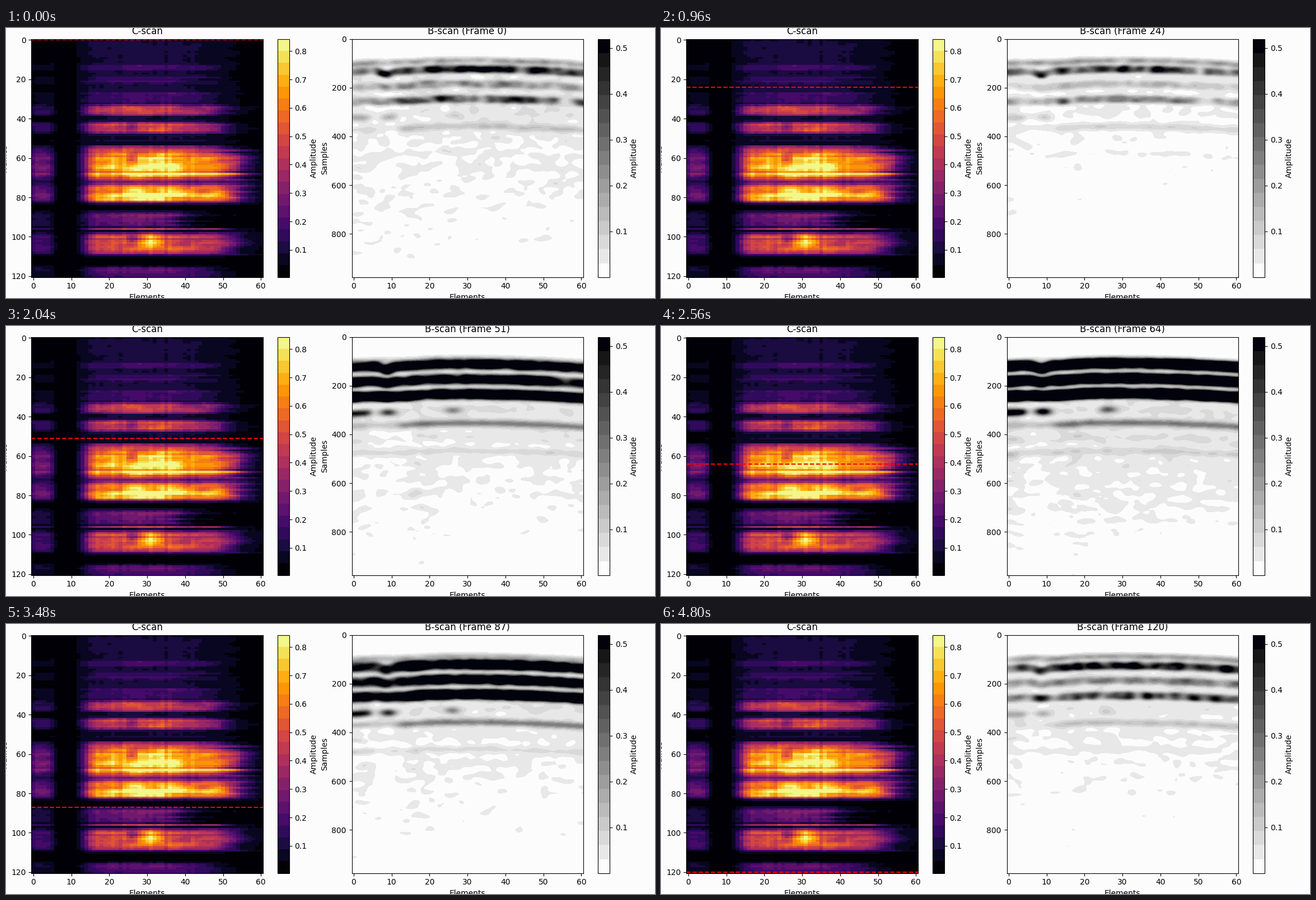
A matplotlib script that plays this animation: 1159 px wide and 483 px high, repeating every 4.84 s.

```python
import numpy as np
import matplotlib.pyplot as plt
from matplotlib.animation import FuncAnimation
from matplotlib.cm import ScalarMappable
from matplotlib.colors import ListedColormap, Normalize

W, H, DPI = 1159, 483, 100
FRAMES, ELEMS, DEPTH = 121, 61, 977.6
PAPER = "#fcfcfc"

rng = np.random.default_rng(7)
el = np.arange(ELEMS, dtype=float)
z = np.linspace(2, DEPTH - 2, 245)[:, None]


def bell(x, mid, width, power=2):
    return np.exp(-np.abs((x - mid) / width) ** power)


def step(x, edge, width):
    return 1 / (1 + np.exp(-(x - edge) / width))


def smooth(a, n, axis):
    k = np.hanning(n + 2)[1:-1]
    pad = [(0, 0), (0, 0)]
    pad[axis] = (n // 2, n // 2)
    a = np.pad(a, pad, mode="reflect")
    return np.apply_along_axis(np.convolve, axis, a, k / k.sum(), "valid")


def grain(rows, ny, nx):
    g = smooth(smooth(rng.normal(size=(rows, ELEMS)), ny, 0), nx, 1)
    return g / g.std()


# ---------- C-scan: horizontal bands of (row, half height, peak, right edge)
BANDS = [(14, 1.2, .11, 48), (20, 2, .08, 44), (29, 3, .09, 46),
         (35.5, 2.8, .38, 50), (44.5, 3, .38, 51), (55, 1.5, .3, 50),
         (64, 8, .74, 54), (77.8, 4.7, .82, 55), (91, 4, .24, 40),
         (96, .7, .4, 50), (103.5, 5.6, .52, 53), (118, 2.8, .2, 48)]


def make_cscan():
    row = np.arange(FRAMES, dtype=float)[:, None]
    wobble = 1.5 * rng.normal(size=(FRAMES, 1))
    streak = 1 + .08 * rng.normal(size=(FRAMES, 1))
    body = step(el, 13.8, 1) * (.7 + .3 * bell(el, 30, 13))
    dead = 1 - bell(el, 9, 2.8, 6)
    img = (.035 + .065 * bell(el, 30, 20, 4) * step(-row, -54, 2)) * dead * streak
    for mid, half, peak, edge in BANDS:
        layer = peak * bell(row, mid, half, 6) * streak
        img = img + layer * body * step(-el, -edge - wobble, 2)
        img += .3 * layer * bell(el, 2.2, 3.2, 4)
    shade = 1 + .06 * grain(FRAMES, 3, 7) + .05 * rng.normal(size=ELEMS)
    for mid in (44, 60, 101):
        shade -= .4 * bell(row, mid, 3) * bell(el, 26, 1.7)
    shade += .45 * bell(row, 101.5, 4) * bell(el, 31, 2.5)
    return np.clip(img * shade, .005, .842)


# ---------- B-scan: key times, arrival shift, haze depth, echo strength
TIME = [0, 24, 38, 64, 87, 100, 120]
SHIFT = [15, 16, 7, 0, 13, 0, 18]
HAZE = [480, 270, 450, 670, 500, 540, 440]
GAIN = [.28, .19, .47, 1.4, 1, .95, .32]

ARCH = -3 + 15 * ((el - 30) / 30) ** 2 + .06 * (el - 30) + 5 * bell(el, 13, 5)
SAG = 14 * bell(el, 8.6, 1.8)
NOISE = [grain(len(z), 9, 3) for _ in range(17)]
RIPPLE = [grain(3, 1, 3) for _ in range(17)]


def blend(fields, t):
    i, u = divmod(t / 8, 1)
    i = int(i)
    return fields[i] * np.cos(u * np.pi / 2) + fields[i + 1] * np.sin(u * np.pi / 2)


def bscan(t):
    shift, haze, gain = (np.interp(t, TIME, k) for k in (SHIFT, HAZE, GAIN))
    full = min(gain, 1)
    noise, ripple = blend(NOISE, t), blend(RIPPLE, t)
    d = z - ARCH

    across = 1 - .5 * bell(el, 3, 9, 4) * (1 - bell(t, 55, 26, 4))
    across = across + .5 * bell(el, 8.6, 2) * (1.2 - full)
    across -= .75 * bell(el, 26, 2) * bell(t, 99, 10)
    across -= .4 * step(el, 49, 1.5) * bell(t, 25, 25)

    img = (.06 + .005 * shift) * bell(d, 90, 14)
    echoes = .6 * gain + .27, .8 * gain ** 1.3, gain
    for k, amp in enumerate(echoes):
        centre = 110 + 61.5 * k + shift
        lobe = bell(d - SAG * (1, .6, .2)[k], centre, 14 + 6 * full, 3)
        img = img + amp * across * (1 + (.3 - .15 * full) * ripple[k]) * lobe
    img *= 1 + .18 * (1 - .6 * full) * noise

    # later, weaker arrivals
    patch = step(-el, -4.3, .4) + bell(el, 9, 2) + .5 * bell(el, 26, 2)
    img += .45 * gain * patch * bell(d, 300 + shift, 14)
    tail = .35 + .65 * step(el, 12, .6)
    img += (.02 + .2 * full) * tail * bell(d, 354 + shift / 2, 14)
    img += .04 * full * bell(d, 470, 12)

    # speckled haze fading with depth, rougher in two columns
    rough = bell(el, 1, 3) + bell(el, 17, 2.5)
    fog = np.minimum(.031 * np.exp((haze - z) / 380), .055)
    fog = fog * (1 - .28 * bell(el, 8, 4)) * (1 + .16 * np.cos(2 * np.pi * (d - 470) / 57))
    level = .007 + .002 * full + .006 * bell(t, 0, 12) + .008 * full * rough
    haze_part = fog + .006 * rough + level * noise
    return img + haze_part * step(d, 84, 5) * (1 - .6 * step(z, 900, 50))


# ---------- figure
fig = plt.figure(figsize=(W / DPI, H / DPI), dpi=DPI, facecolor=PAPER)
TOP, BOTTOM = 19.7, 445.6


def panel(x, width):
    return fig.add_axes([x / W, 1 - BOTTOM / H, width / W, (BOTTOM - TOP) / H],
                        facecolor=PAPER)


def add_bar(x, cmap, norm):
    bar = fig.colorbar(ScalarMappable(norm, cmap), cax=panel(x, 21.3))
    bar.set_label("Amplitude")


grey = np.repeat(247 - 15 * np.arange(17)[:, None], 3, axis=1)
grey[0], grey[-1] = 252, (2, 2, 12)
grey_map = ListedColormap(grey / 255)
fire_map = ListedColormap(plt.get_cmap("inferno")(np.linspace(.01, .97, 20)))
c_norm, b_norm = Normalize(.004, .8425), Normalize(.0004, .5196)

ax_c = panel(45.4, 413.3)
ax_c.imshow(make_cscan(), cmap=fire_map, norm=c_norm, aspect="auto",
            interpolation="nearest")
cursor = ax_c.axhline(0, color="red", ls="--", lw=1.5)
ax_c.set(title="C-scan", xlabel="Elements", ylabel="Frames",
         xlim=(-.5, 60.5), ylim=(120.5, -.5))
add_bar(484.5, fire_map, c_norm)

ax_b = panel(617.5, 413.3)
scan = ax_b.imshow(bscan(0), cmap=grey_map, norm=b_norm, aspect="auto",
                   interpolation="bicubic", extent=(-.5, 60.5, DEPTH, 0))
ax_b.set(xlabel="Elements", ylabel="Samples")
title = ax_b.set_title("B-scan (Frame 0)")
add_bar(1056.7, grey_map, b_norm)


def update(i):
    cursor.set_ydata([i, i])
    scan.set_data(bscan(i))
    title.set_text(f"B-scan (Frame {i})")
    return cursor, scan, title


anim = FuncAnimation(fig, update, frames=FRAMES, interval=40, repeat=True,
                     repeat_delay=0, blit=False)
plt.show()
```
